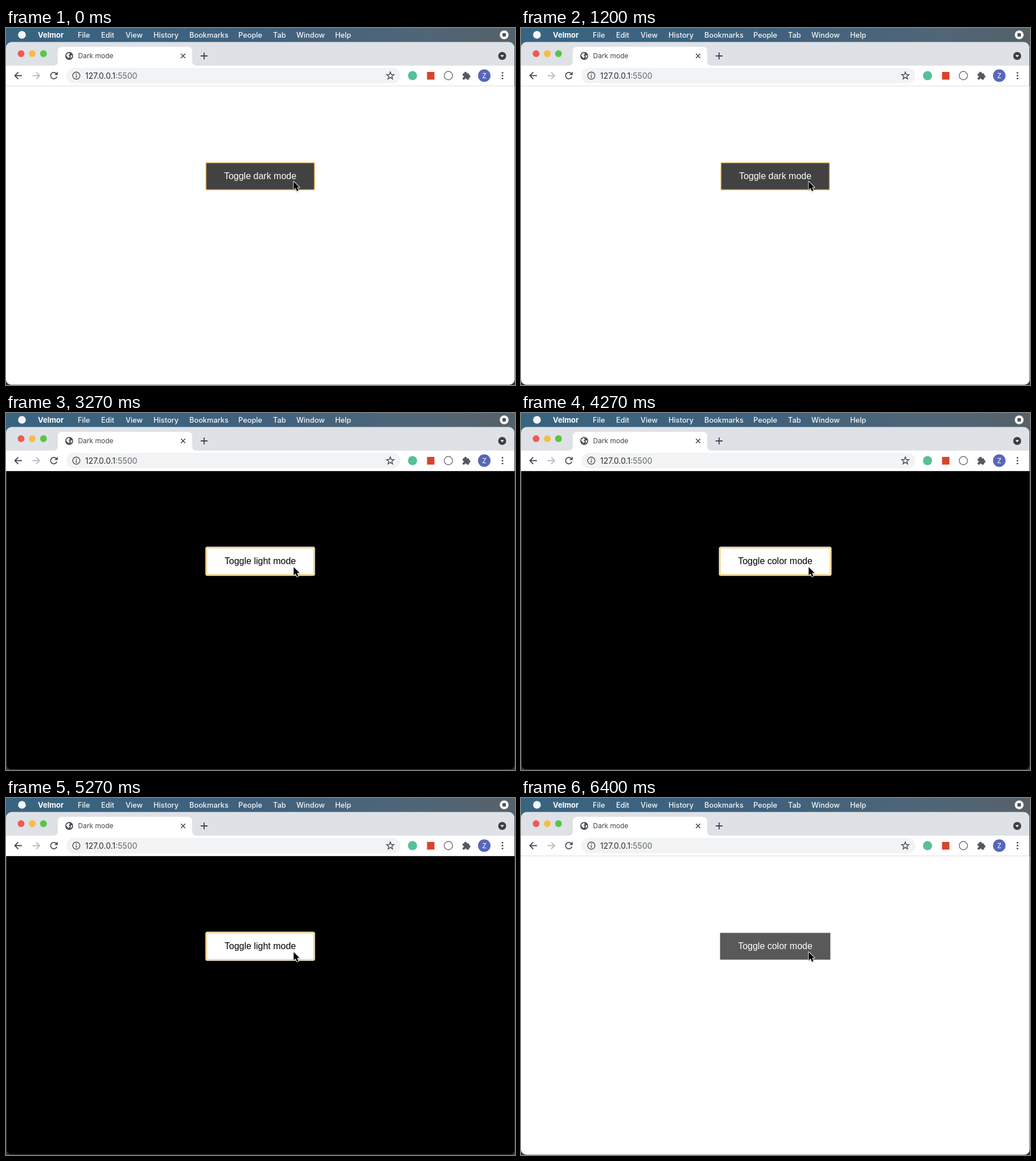
Animation of 894 by 626 pixels, one loop 6600 ms. Source, as an HTML page with a canvas:

```html
<!DOCTYPE html>
<html lang="en">
<head>
<meta charset="utf-8">
<title>Dark mode</title>
<style>
html, body { margin: 0; width: 100%; height: 100%; overflow: hidden; background: #30363a; }
canvas { display: block; }
</style>
</head>
<body>
<canvas id="stage" width="894" height="626"></canvas>
<script>
const LOOP = 6600;
const INK = '#4b4f53';
const UI = 'Inter, sans-serif';
const ctx = document.getElementById('stage').getContext('2d');

// start time, dark page, label word, focused
const states = [
  [0, false, 'dark', true],
  [400, true, 'light', true],
  [1070, false, 'dark', true],
  [2200, false, 'color', false],
  [2870, false, 'color', true],
  [3070, true, 'light', true],
  [4000, true, 'color', false],
  [4270, true, 'color', true],
  [4730, false, 'dark', true],
  [5270, true, 'light', true],
  [5530, false, 'dark', true],
  [6330, false, 'color', false]
];

const menus = [
  ['File', 126], ['Edit', 167], ['View', 210], ['History', 259], ['Bookmarks', 322],
  ['People', 408], ['Tab', 469], ['Window', 510], ['Help', 578]
];

function box(x, y, w, h, r, fill) {
  ctx.fillStyle = fill;
  ctx.beginPath();
  ctx.roundRect(x, y, w, h, r);
  ctx.fill();
}

function disc(x, y, r, fill) {
  ctx.fillStyle = fill;
  ctx.beginPath();
  ctx.arc(x, y, r, 0, Math.PI * 2);
  ctx.fill();
}

function ring(x, y, r, color, width) {
  ctx.strokeStyle = color;
  ctx.lineWidth = width;
  ctx.beginPath();
  ctx.arc(x, y, r, 0, Math.PI * 2);
  ctx.stroke();
}

function text(str, x, y, font, fill, align = 'left') {
  ctx.font = font;
  ctx.fillStyle = fill;
  ctx.textAlign = align;
  ctx.fillText(str, x, y);
}

function path(d, x, y, color, width) {
  const p = new Path2D(d);
  ctx.save();
  ctx.translate(x, y);
  if (width) {
    ctx.strokeStyle = color;
    ctx.lineWidth = width;
    ctx.stroke(p);
  } else {
    ctx.fillStyle = color;
    ctx.fill(p);
  }
  ctx.restore();
}

function drawMenuBar() {
  const g = ctx.createLinearGradient(0, 0, 894, 0);
  g.addColorStop(0, '#386480');
  g.addColorStop(0.5, '#40617e');
  g.addColorStop(0.8, '#4f6678');
  g.addColorStop(1, '#566169');
  ctx.fillStyle = g;
  ctx.fillRect(0, 0, 894, 36);
  disc(28, 12, 6.8, '#f4f6f8');
  text('Velmor', 56, 17, `700 13px ${UI}`, '#fff');
  for (const [name, x] of menus) text(name, x, 17, `500 12.8px ${UI}`, '#f5f7f8');
  disc(875, 12, 7.8, '#f6f6f6');
  box(872, 9, 6, 6, 1, '#4d565d');
}

function drawTabs() {
  box(0, 24.5, 893, 50, [10, 10, 0, 0], '#dee1e6');
  disc(26.5, 45, 6, '#ee5b52');
  disc(46.2, 45, 6, '#f6bd45');
  disc(65.8, 45, 6, '#58c543');
  path('M83 66 Q91 66 91 58 V41 Q91 33 99 33 H319 Q327 33 327 41 V58 Q327 66 335 66 Z', 0, 0, '#fff');

  disc(111, 49, 7, INK);
  path('M-5.4 -1 Q-4 -4.5 0 -5.5 L1 -3 L-1 -1 L1 1 L-1 4 L-3 2 Z M2 -1 L5.5 -1 Q5.5 2 2 4.5 L3 1 Z', 111, 49, '#fff');
  text('Dark mode', 126.5, 53, `400 12px ${UI}`, '#3f4347');
  path('M-3.7 -3.7 L3.7 3.7 M3.7 -3.7 L-3.7 3.7', 311, 49, '#414549', 1.6);
  path('M-6 0 H6 M0 -6 V6', 348, 49, '#414549', 1.8);
  disc(871.5, 49, 7, '#3c4043');
  path('M-3.2 -1.5 H3.2 L0 2.2 Z', 871.5, 49, '#fff');
}

function drawStar(x, y) {
  ctx.beginPath();
  for (let i = 0; i < 10; i++) {
    const r = i % 2 ? 2.8 : 6.8;
    const a = i * Math.PI / 5 - Math.PI / 2;
    ctx.lineTo(x + r * Math.cos(a), y + r * Math.sin(a));
  }
  ctx.closePath();
  ctx.strokeStyle = INK;
  ctx.lineWidth = 1.4;
  ctx.stroke();
}

function drawToolbar() {
  ctx.fillStyle = '#fff';
  ctx.fillRect(0, 66, 893, 36);
  const arrow = 'M6.5 0 H-6 M0 -6 L-6 0 L0 6';
  path(arrow, 21.5, 83.5, INK, 1.8);
  ctx.save();
  ctx.scale(-1, 1);
  path(arrow, -53, 83.5, '#babcbf', 1.8);
  ctx.restore();

  ctx.strokeStyle = INK;
  ctx.lineWidth = 1.8;
  ctx.beginPath();
  ctx.arc(84, 83.5, 5.6, 0.3, Math.PI * 1.75);
  ctx.stroke();
  path('M6.8 -7 V-1 H0.8 Z', 84, 83.5, INK);

  box(106, 70, 586.5, 27, 13.5, '#f1f3f4');
  ring(123.5, 83.5, 6.3, INK, 1.4);
  path('M0 -3.7 V-2.1 M0 -0.7 V3.7', 123.5, 83.5, INK, 1.5);
  text('127.0.0.1', 139, 88.5, `400 14px ${UI}`, '#2b2e32');
  const w = ctx.measureText('127.0.0.1').width;
  text(':5500', 139 + w, 88.5, `400 14px ${UI}`, '#64686c');
  drawStar(675, 83.8);

  disc(714, 83.5, 8, '#55c09a');
  box(739.5, 77, 13, 13.5, 0, '#d9432a');
  ring(777, 83.5, 7.3, '#55585b', 1.2);

  box(802, 79.5, 11.5, 11, 1.5, '#55595d');
  disc(807, 79, 2.3, '#55595d');
  disc(813.5, 85, 2.3, '#55595d');
  disc(802.3, 85.3, 1.8, '#fff');
  disc(807.3, 90.3, 1.8, '#fff');

  disc(840, 83.5, 11, '#5767b8');
  text('Z', 840, 87.7, `400 12px ${UI}`, '#fff', 'center');
  for (const y of [78.5, 83.5, 88.5]) disc(872, y, 1.5, INK);
}

function drawPage(dark) {
  box(0, 102, 893.3, 523.4, [0, 0, 9, 9], dark ? '#4a4a4a' : '#fff');
  if (dark) box(1, 102, 892, 523, [0, 0, 8, 8], '#000');
  ctx.fillStyle = dark ? '#d5d7da' : '#dcdee1';
  ctx.fillRect(0, 101, 893, 1);
}

function drawButton(dark, word, focused) {
  const label = `Toggle ${word} mode`;
  const font = '16px "Liberation Sans", Arial, sans-serif';
  ctx.font = font;
  const w = ctx.measureText(label).width + 63;
  const x = 446.5 - w / 2;
  const y = 236.5;
  const h = 47;
  if (focused) box(x - 2, y - 2, w + 4, h + 4, 3.5, '#fff');
  box(x, y, w, h, 0, dark ? '#fff' : focused ? '#424242' : '#595959');
  if (focused) {
    ctx.strokeStyle = dark ? '#ebc465' : '#d7a02d';
    ctx.lineWidth = 1.5;
    ctx.beginPath();
    ctx.roundRect(x, y, w, h, 1.5);
    ctx.stroke();
  }
  text(label, 446.5, 265, font, dark ? '#000' : '#fff', 'center');
}

function drawCursor(y) {
  const d = 'M0 0 V14.2 L3.3 11.2 L5.7 16.8 L8.3 15.7 L5.9 10.3 H10.2 Z';
  ctx.save();
  ctx.lineJoin = 'round';
  ctx.shadowColor = 'rgba(0,0,0,0.3)';
  ctx.shadowBlur = 2;
  ctx.shadowOffsetY = 1;
  path(d, 505.3, y, '#fff', 1.8);
  ctx.restore();
  path(d, 505.3, y, '#000');
}

function draw(t) {
  const [, dark, word, focused] = states.findLast(s => s[0] <= t);
  ctx.fillStyle = '#30363a';
  ctx.fillRect(0, 0, 894, 626);
  drawMenuBar();
  drawTabs();
  drawToolbar();
  drawPage(dark);
  drawButton(dark, word, focused);
  drawCursor(t < 2050 ? 269.2 : 270.2);
}

const start = performance.now();
function tick() {
  draw((performance.now() - start) % LOOP);
  requestAnimationFrame(tick);
}
tick();
</script>
</body>
</html>
```
